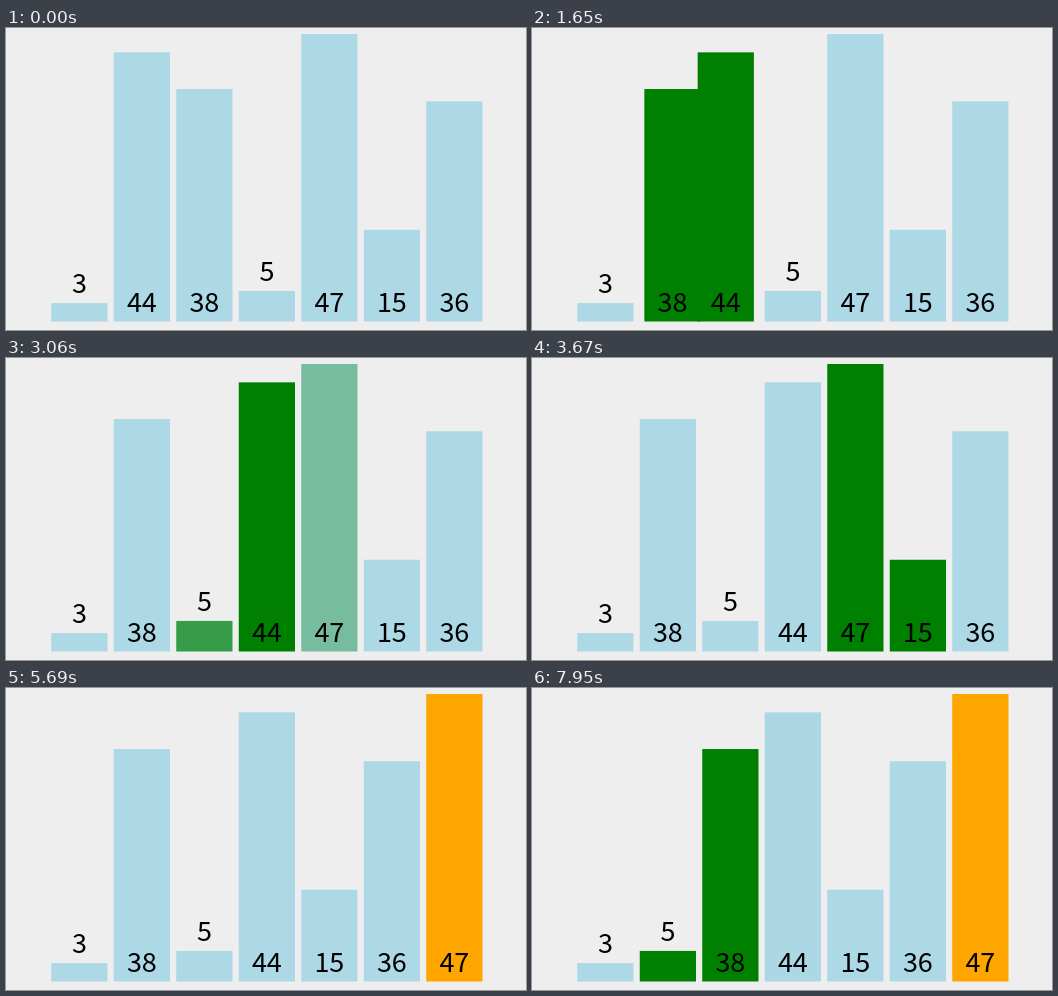
Write an HTML page that moves like this. It is 520 px wide and 302 px high and loops after 8 s.

```html
<!DOCTYPE html>
<html lang="en">
<head>
<meta charset="utf-8">
<title>Bubble sort</title>
<style>
  html, body { margin: 0; width: 100%; height: 100%; overflow: hidden; background: #eee; }
  svg { display: block; width: 520px; height: 302px; }
  text {
    font: 27px "Noto Sans CJK SC", "Noto Sans CJK JP", "Open Sans", sans-serif;
    text-anchor: middle;
  }
</style>
</head>
<body>
<svg viewBox="0 0 520 302"></svg>
<script>
const LOOP = 8000, TICK = 75, TICK_ADVANCE = 77, DURATION = 250;
const LEFT = 45.25, PITCH = 62.5, WIDTH = 56.25, FLOOR = 293.5;
const UNIT = 287.5 / 47;
const BLUE = [173, 216, 230], GREEN = [0, 128, 0], ORANGE = [255, 165, 0];
const values = [3, 44, 38, 5, 47, 15, 36];

// Time of the first visible change, progress in ms at that moment, action, slot
const steps = [
  [500, 80, "compare", 0],
  [1040, 80, "compare", 1],
  [1500, 30, "swap", 1],
  [1960, 30, "compare", 2],
  [2430, 30, "swap", 2],
  [2970, 30, "compare", 3],
  [3520, 80, "compare", 4],
  [3980, 30, "swap", 4],
  [4450, 30, "compare", 5],
  [4920, 30, "swap", 5],
  [5460, 30, "settle", 6],
  [6470, 80, "compare", 0],
  [7020, 80, "compare", 1],
  [7400, 30, "swap", 1],
  [7950, 30, "compare", 2]
];

const actions = {
  compare({ order, colors }, slot) {
    clear(colors);
    colors[order[slot]] = colors[order[slot + 1]] = GREEN;
  },
  swap({ order }, slot) {
    [order[slot], order[slot + 1]] = [order[slot + 1], order[slot]];
  },
  settle({ order, colors }, slot) {
    clear(colors);
    colors[order[slot]] = ORANGE;
  }
};

function clear(colors) {
  colors.forEach((color, i) => { if (color === GREEN) colors[i] = BLUE; });
}

const states = [{ order: values.map((_, i) => i), colors: values.map(() => BLUE) }];
for (const [, , action, slot] of steps) {
  const { order, colors } = states[states.length - 1];
  const next = { order: [...order], colors: [...colors] };
  actions[action](next, slot);
  states.push(next);
}

const svg = document.querySelector("svg");
function add(tag, attributes) {
  const node = document.createElementNS(svg.namespaceURI, tag);
  for (const name in attributes) node.setAttribute(name, attributes[name]);
  return svg.appendChild(node);
}

const bars = values.map(v => add("rect", { y: FLOOR - v * UNIT, width: WIDTH, height: v * UNIT }));
const labels = values.map(v => {
  const label = add("text", { y: v < 10 ? FLOOR - v * UNIT - 10 : FLOOR - 9.5 });
  label.textContent = v;
  return label;
});

const mix = (a, b, k) => a + (b - a) * k;
const cubicInOut = u => u < 0.5 ? 4 * u ** 3 : 1 - 4 * (1 - u) ** 3;

function draw(time) {
  const count = steps.filter(([start]) => start <= time).length;
  const to = states[count], from = states[Math.max(0, count - 1)];
  let k = 1;
  if (count) {
    const [start, lead] = steps[count - 1];
    const elapsed = lead + Math.floor((time - start) / TICK) * TICK_ADVANCE;
    k = cubicInOut(Math.min(1, elapsed / DURATION));
  }
  values.forEach((_, i) => {
    const x = LEFT + PITCH * mix(from.order.indexOf(i), to.order.indexOf(i), k);
    const rgb = from.colors[i].map((c, n) => Math.round(mix(c, to.colors[i][n], k)));
    bars[i].setAttribute("x", x);
    bars[i].setAttribute("fill", `rgb(${rgb})`);
    labels[i].setAttribute("x", x + WIDTH / 2);
  });
}

const origin = performance.now();
function tick() {
  draw((performance.now() - origin) % LOOP);
  requestAnimationFrame(tick);
}
tick();
</script>
</body>
</html>
```
